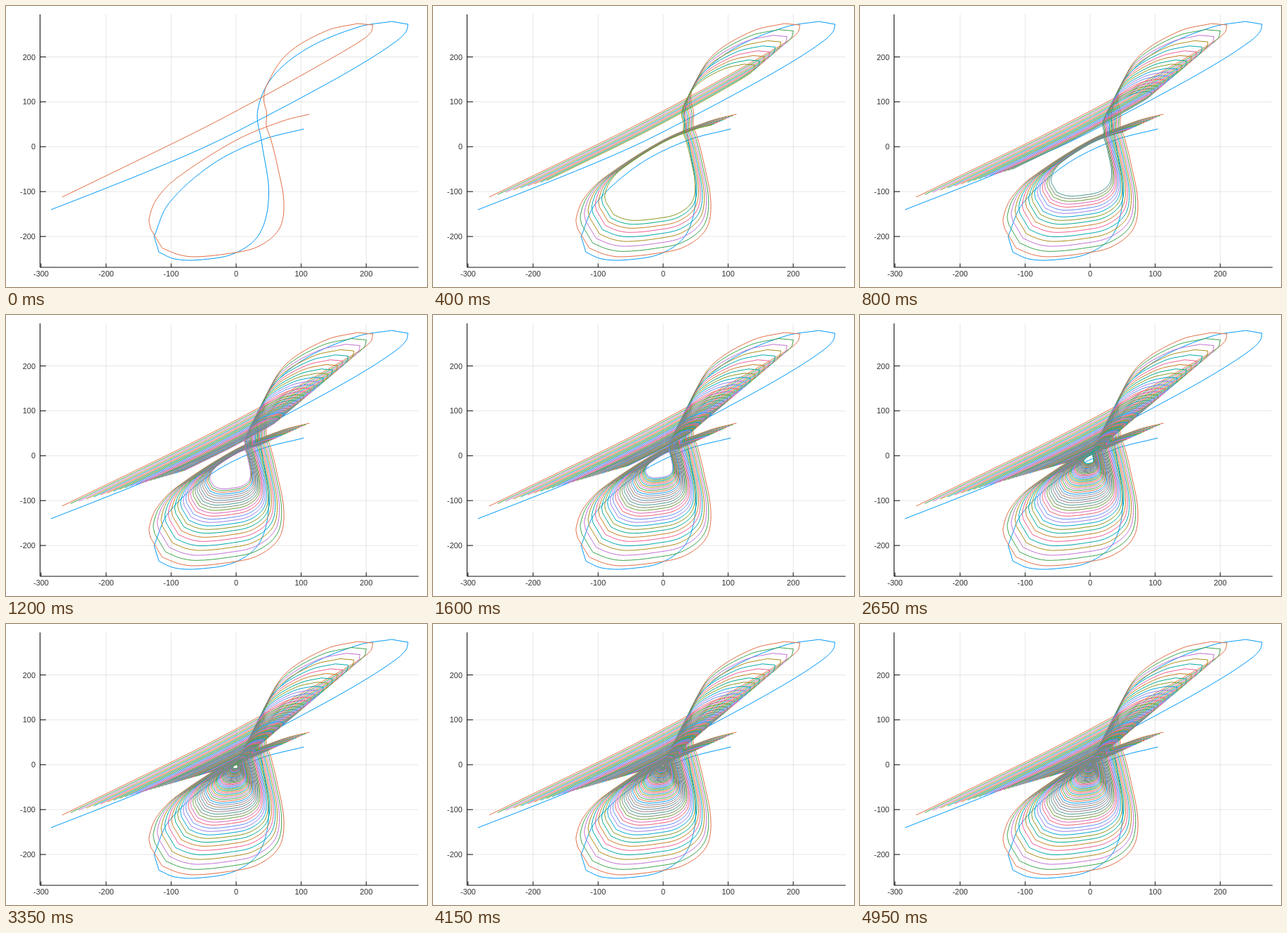
Recreate the animation shown at these times as an HTML page. Size 600 by 400 pixels, loop 5 s.

```html
<!DOCTYPE html>
<html lang="en">
<head>
<meta charset="utf-8">
<title>Shrinking curves</title>
<style>
  html, body { margin: 0; width: 100%; height: 100%; overflow: hidden; background: #fff; }
  svg { display: block; width: 600px; height: 400px; }
  text { font: 11px "Liberation Sans", Arial, sans-serif; fill: #333; }
  .grid { stroke: #000; stroke-opacity: .1; }
  .axis { stroke: #111; fill: none; }
  .curve { fill: none; stroke-linejoin: round; }
</style>
</head>
<body>
<svg id="plot" viewBox="0 0 600 400" xmlns="http://www.w3.org/2000/svg"></svg>
<script>
const STEP = 50, COUNT = 100, DECAY = 0.05;
const ORIGIN = { x: 328, y: 200.3 }, UNIT = { x: 0.9267, y: 0.639 };

const COLORS = ("#009af9 #e26f46 #3da44d #c271d2 #ac8d18 #00a9ad #ed5d92 #c68125 #00a98d " +
  "#8e971d #00a8cb #9b7fe8 #608cf6 #f05f73 #dd64b5 #6b9e32 #718c69 #48988e " +
  "#9a7d86 #5f8fa8 #a0806a #7f86a8").split(" ");

// Key points in stage pixels; "|" ends a smooth piece at a corner.
const REFERENCE = `64,290 175,246.5 283,201 365,160 455,112 515,77.5 557,49.5 570.5,36 573,26 |
  549.5,22 502,30 430,60 379,102 358.5,150 364.5,194.5 374.5,268 361.5,324 326,352
  274,361.5 240,360 218,350.5 | 211,328 232,281 293,226 362,191.5 424.5,175`;
const START = `80,272 175,226 284,172.5 380,121.5 455,79.5 505,50 520,37.5 523,27 |
  500.5,25 456,35.5 400,69 371,114 367.5,134 371.5,152 371,170.5 377,188 386,224
  396,280 389,318 358,343 316,352.5 268,357 244.5,353.5 222.5,344.5 | 206,317 204,303
  214.5,275 242,246 328,191 395,163.5 432.5,154`;

const plot = document.getElementById("plot");

function add(tag, attrs, text) {
  const node = document.createElementNS(plot.namespaceURI, tag);
  for (const key in attrs) node.setAttribute(key, attrs[key]);
  if (text !== undefined) node.textContent = text;
  return plot.appendChild(node);
}

const parse = text => text.split("|").map(piece =>
  piece.trim().split(/\s+/).map(p => p.split(",").map(Number)));

// Unit tangent at point i, parallel to the chord of its neighbours.
function tangent(points, i) {
  const [ax, ay] = points[Math.max(i - 1, 0)];
  const [bx, by] = points[Math.min(i + 1, points.length - 1)];
  const length = Math.hypot(bx - ax, by - ay);
  return [(bx - ax) / length, (by - ay) / length];
}

function smoothPath(pieces, scale) {
  const at = (x, y) => (ORIGIN.x + (x - ORIGIN.x) * scale).toFixed(2) + " " +
    (ORIGIN.y + (y - ORIGIN.y) * scale).toFixed(2);
  return pieces.map((points, n) => points.map(([x, y], i) => {
    if (i === 0) return (n ? "L" : "M") + at(x, y);
    const [px, py] = points[i - 1];
    const [ux, uy] = tangent(points, i - 1), [vx, vy] = tangent(points, i);
    const handle = Math.hypot(x - px, y - py) / 3;
    return `C${at(px + ux * handle, py + uy * handle)} ` +
      `${at(x - vx * handle, y - vy * handle)} ${at(x, y)}`;
  }).join("")).join("");
}

const addCurve = (pieces, scale, color) =>
  add("path", { class: "curve", d: smoothPath(pieces, scale), stroke: color });

function drawAxes() {
  for (let v = -300; v <= 200; v += 100) {
    const x = ORIGIN.x + v * UNIT.x;
    add("path", { class: "grid", d: `M${x} 12V372` });
    add("path", { class: "axis", d: `M${x} 372V366.5` });
    add("text", { x, y: 385, "text-anchor": "middle" }, v);
    if (v < -200) continue;
    const y = ORIGIN.y - v * UNIT.y;
    add("path", { class: "grid", d: `M49 ${y}H588` });
    add("path", { class: "axis", d: `M49 ${y}H57` });
    add("text", { x: 42, y: y + 4, "text-anchor": "end" }, v);
  }
  add("path", { class: "axis", d: "M48.5 12V372H588" });
}

drawAxes();
addCurve(parse(REFERENCE), 1, COLORS[0]);
const start = parse(START);
const curves = Array.from({ length: COUNT }, (_, k) =>
  addCurve(start, Math.exp(-DECAY * k), COLORS[(k + 1) % COLORS.length]));

const began = performance.now();
function render() {
  const last = Math.floor((performance.now() - began) / STEP) % COUNT;
  curves.forEach((curve, k) => curve.setAttribute("display", k <= last ? "inline" : "none"));
  requestAnimationFrame(render);
}
render();
</script>
</body>
</html>
```
